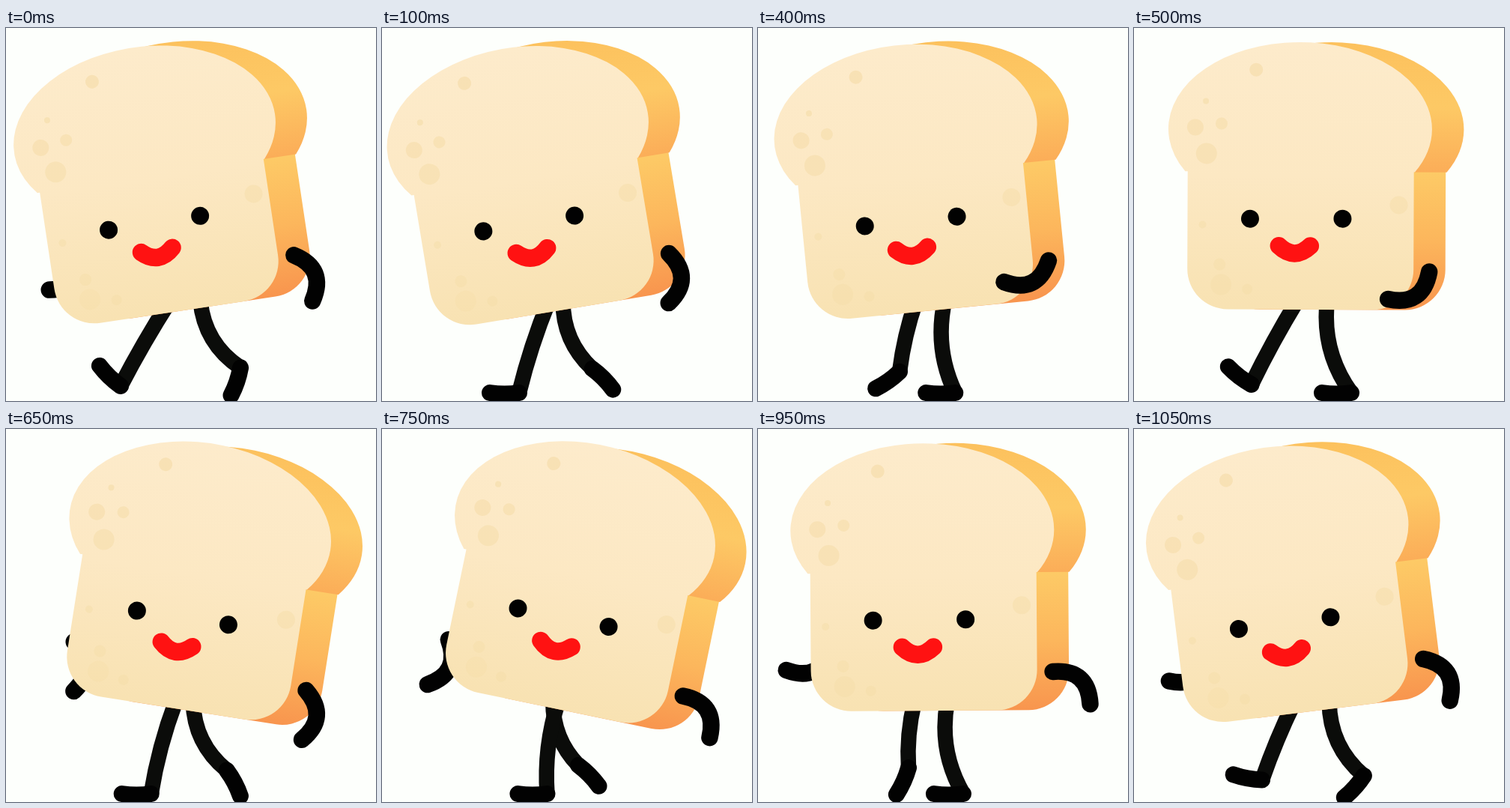
Animation, 494 px wide and 498 px high, one loop 1.1 s. Source, as an HTML page with a canvas:

```html
<!DOCTYPE html>
<html lang="en">
<head>
<meta charset="utf-8">
<title>Walking toast</title>
<style>
html, body { margin: 0; width: 100%; height: 100%; overflow: hidden; background: #fdfffc; }
canvas { display: block; }
</style>
</head>
<body>
<canvas id="stage" width="494" height="498"></canvas>
<script>
const ctx = document.getElementById('stage').getContext('2d');
const LOOP = 1100, STEP = 50, LEAD = 40;
const PIVOT = { x: 244, y: 379 };
const INK = '#020202', LEG_INK = '#0b0c0a';

const rad = degrees => degrees * Math.PI / 180;

// A cosine that repeats `turns` times per loop.
const wave = (t, turns, phase) => Math.cos(turns * 2 * Math.PI * t / LOOP + rad(phase));

const leanAngle = t => -1.4 - 10.85 * wave(t, 1, -57) - 2.2 * wave(t, 2, 56) + 0.7 * wave(t, 3, -90);
const armAngle = t => 94 + 57 * wave(t, 1, -125) + 8 * wave(t, 2, 35);

// Key poses of one step: time, hip x, ankle x, ankle y, foot direction.
const STRIDE = [
  [0, 219, 153, 478, 224],      // heel lands
  [100, 223, 183, 487, 180],    // foot flat
  [500, 258, 290, 487, 180],    // heel about to lift
  [545, 261, 309, 460, 126],
  [600, 259, 314, 452, 105],    // toe leaves the ground
  [670, 246, 287, 457, 45],
  [860, 204, 228, 438, 46],     // swinging forward
  [1060, 215, 168, 470, 198]
];

function stride(t) {
  const i = STRIDE.findLastIndex(key => key[0] <= t);
  const [t0, ...from] = STRIDE[i];
  const [t1, ...to] = STRIDE[(i + 1) % STRIDE.length];
  const u = (t - t0) / ((t1 || LOOP) - t0);
  return from.map((v, j) => v + (to[j] - v) * u);
}

function curve(width, color, x0, y0, cx, cy, x1, y1) {
  ctx.lineWidth = width;
  ctx.strokeStyle = color;
  ctx.beginPath();
  ctx.moveTo(x0, y0);
  ctx.quadraticCurveTo(cx, cy, x1, y1);
  ctx.stroke();
}

// A curved limb; `bend` moves its control point sideways from the middle.
function limb(width, color, x0, y0, x1, y1, bend) {
  const dx = x1 - x0, dy = y1 - y0, k = bend / Math.hypot(dx, dy);
  curve(width, color, x0, y0, (x0 + x1) / 2 + dy * k, (y0 + y1) / 2 - dx * k, x1, y1);
}

function leg(time) {
  const t = time % LOOP;
  const [hip, x, y, direction] = stride(t);
  const a = rad(direction);
  limb(20.5, LEG_INK, hip, 364, x, y, 11 * wave(t, 1, 0) - 14);
  limb(22, INK, x, y, x + 39 * Math.cos(a), y + 39 * Math.sin(a), 3);
}

function arm(x, y, degrees) {
  const a = rad(degrees);
  limb(22.5, INK, x, y, x + 66 * Math.cos(a), y + 66 * Math.sin(a), 34);
}

function dot(x, y, r, color) {
  ctx.fillStyle = color;
  ctx.beginPath();
  ctx.arc(x, y, r, 0, 7);
  ctx.fill();
}

function gradient(y0, y1, ...colors) {
  const g = ctx.createLinearGradient(0, y0, 0, y1);
  colors.forEach((c, i) => g.addColorStop(i / (colors.length - 1), c));
  return g;
}

// One silhouette of the bread: a rounded block under an elliptical dome.
function slice(shift, dome, block) {
  ctx.fillStyle = block;
  ctx.beginPath();
  ctx.roundRect(71 + shift, 191, 302, 185, [0, 0, 54, 54]);
  ctx.fill();
  const end = Math.asin(57 / 116);
  ctx.fillStyle = dome;
  ctx.beginPath();
  ctx.ellipse(221 + shift, 135, 176, 116, 0, Math.PI - end, end);
  ctx.fill();
}

function bread() {
  slice(42.5, gradient(19, 192, '#fcc15d', '#fdc965', '#fbad58'),
    gradient(192, 376, '#fdca66', '#fcb65c', '#f8954e'));
  const face = gradient(19, 376, '#fdebcb', '#fce8c3', '#f8e2b2');
  slice(0, face, face);

  const spots = [[162, 56, 9], [95, 98, 4], [81, 133, 11], [116, 128, 8], [96, 168, 14],
    [353, 236, 12], [91, 263, 5], [114, 316, 8], [116, 343, 14], [151, 349, 7]];
  for (const [x, y, r] of spots) dot(x, y, r, `rgba(240,212,150,${0.46 - y / 1200})`);

  dot(154.5, 255, 12, INK);
  dot(278, 254.5, 12, INK);
  curve(23.5, '#ff1212', 193, 291, 214, 311, 235, 291);
}

function draw(now) {
  const t = Math.floor(now / STEP) * STEP % LOOP, opposite = t + LOOP / 2;
  const lean = leanAngle(t), c = Math.cos(rad(lean)), s = Math.sin(rad(lean));
  ctx.fillStyle = '#fdfffc';
  ctx.fillRect(0, 0, 494, 498);
  ctx.lineCap = 'round';

  arm(97 - 0.7 * lean, 293 - lean, armAngle(opposite));
  leg(t);
  leg(opposite + LEAD);

  ctx.save();
  ctx.translate(PIVOT.x, PIVOT.y);
  ctx.rotate(rad(lean));
  ctx.translate(-PIVOT.x, -PIVOT.y);
  bread();
  ctx.restore();

  arm(PIVOT.x + 150 * c + 54 * s, PIVOT.y + 150 * s - 54 * c, armAngle(t));
}

const start = performance.now();
function tick() {
  draw(performance.now() - start);
  requestAnimationFrame(tick);
}
tick();
</script>
</body>
</html>
```
